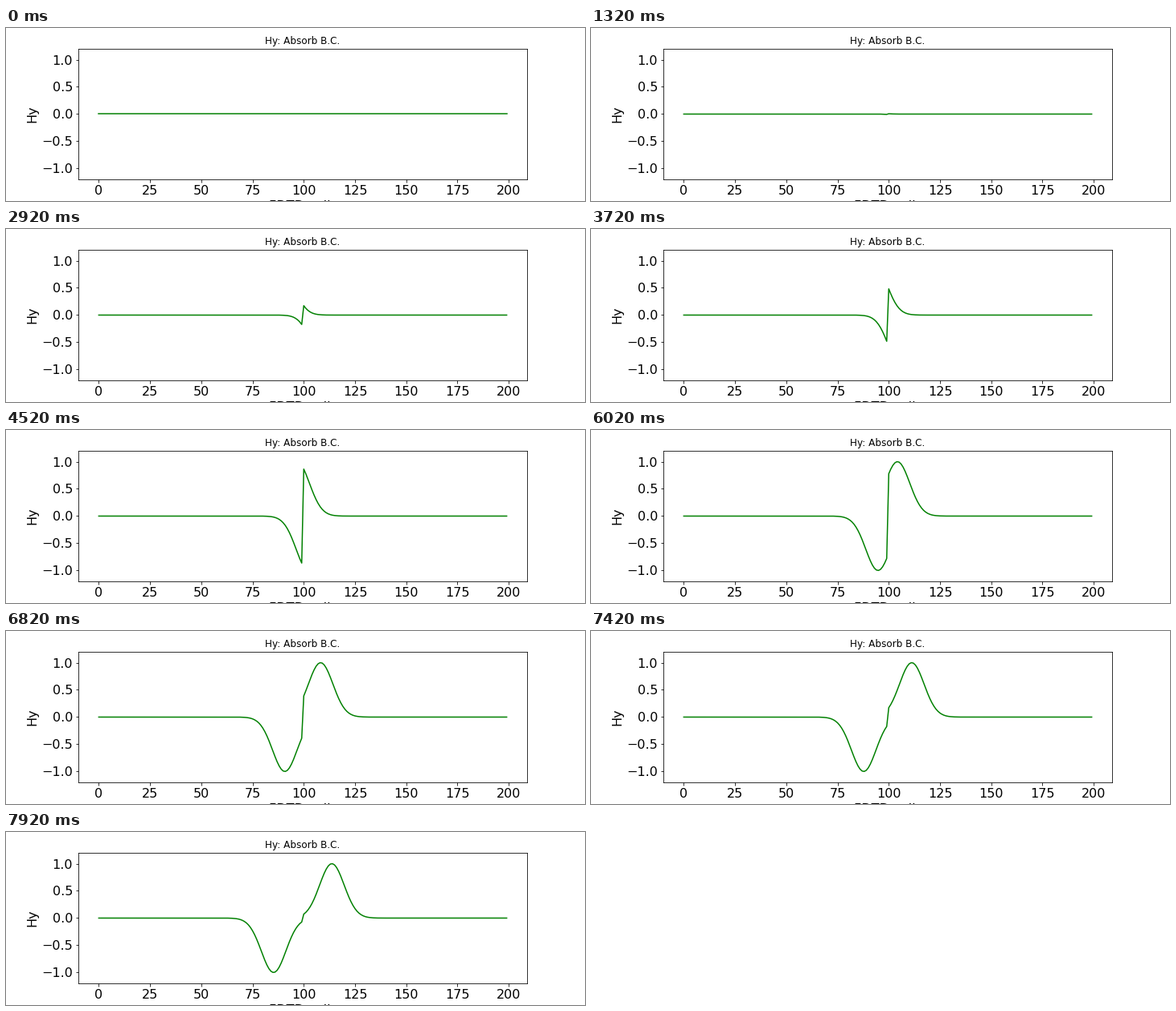
Write a matplotlib script that moves like this. It is 720 px wide and 216 px high and loops after 8000 ms.

```python
import numpy as np
import matplotlib.pyplot as plt
from matplotlib.animation import FuncAnimation

LOOP_MS, TICK_MS = 8000, 20
STEP_MS, START_MS = 100, 620
CELLS, SOURCE = 200, 100
PEAK_STEP, SPREAD = 45, 12


def simulate(steps):
    """1D FDTD with a hard Gaussian source; returns Hy before and after each step."""
    ex, hy = np.zeros(CELLS), np.zeros(CELLS)
    history = [hy.copy()]
    for n in range(steps):
        ex[1:] += 0.5 * (hy[:-1] - hy[1:])
        ex[SOURCE] = np.exp(-0.5 * ((PEAK_STEP - n) / SPREAD) ** 2)
        hy[:-1] += 0.5 * (ex[:-1] - ex[1:])
        history.append(hy.copy())
    return history


fields = simulate((LOOP_MS - START_MS) // STEP_MS + 1)

fig, ax = plt.subplots(figsize=(10, 3), dpi=72)
fig.subplots_adjust(left=0.125, right=0.9, bottom=0.125, top=0.88)
line, = ax.plot(np.arange(CELLS), fields[0], color="green", lw=1.5)
ax.set_xlim(-9.95, 208.95)
ax.set_ylim(-1.2, 1.2)
ax.set_xticks(range(0, 201, 25))
ax.set_yticks(np.arange(-1, 1.1, 0.5))
ax.tick_params(labelsize=16)
ax.set_title("Hy: Absorb B.C.", fontsize=12)
ax.set_xlabel("FDTD cells", fontsize=16)
ax.set_ylabel("Hy", fontsize=16)


def update(i):
    t = i * TICK_MS
    # the first step shows a little early, then one step every 100 ms
    step = 0 if t < START_MS - 40 else 1 + max(0, (t - START_MS) // STEP_MS)
    line.set_ydata(fields[step])
    return line,


def reset():
    return update(0)


anim = FuncAnimation(fig, update, frames=LOOP_MS // TICK_MS, init_func=reset,
                     interval=TICK_MS, repeat=True, repeat_delay=0)
plt.show()
```
